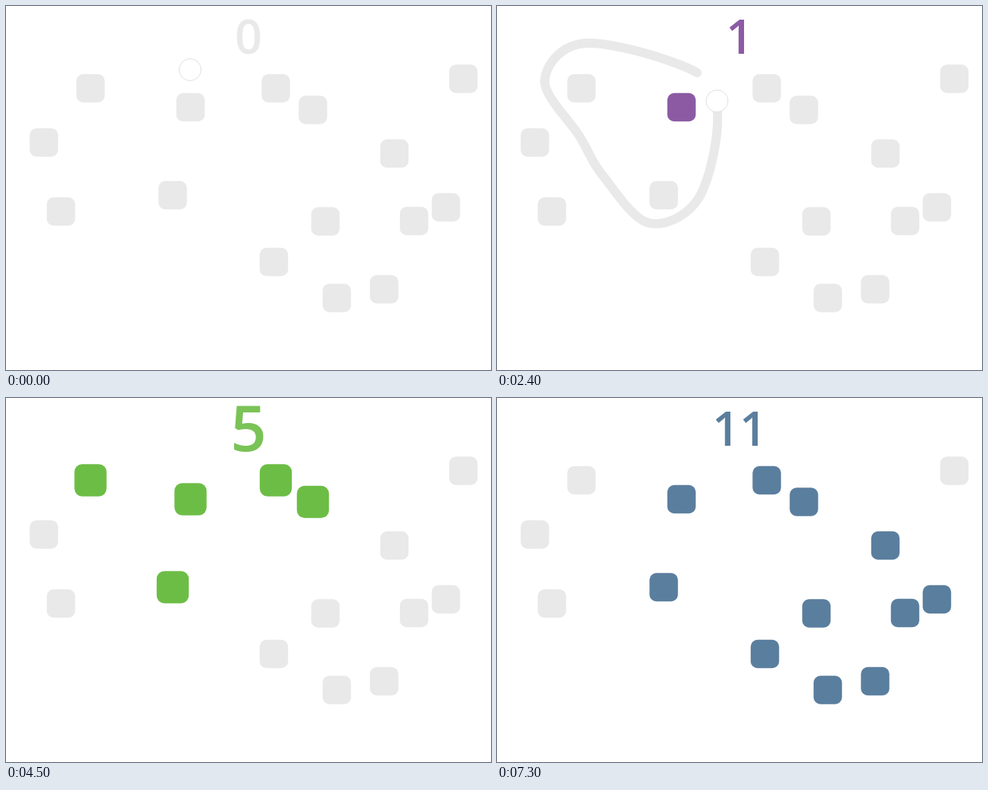
Animation of 640x480 px, one loop 7.8 s. Source, as an HTML page with a canvas:

```html
<!DOCTYPE html>
<html lang="en">
<head>
<meta charset="utf-8">
<title>Lasso counter</title>
<style>
html, body { margin: 0; width: 100%; height: 100%; overflow: hidden; background: #fff; }
canvas { display: block; }
</style>
</head>
<body>
<canvas id="stage" width="640" height="480"></canvas>
<script>
const ctx = document.getElementById('stage').getContext('2d');
const LOOP = 7800, STEP = 100, POP = 300, GREY = '#e9e9e9';

// Ordered so that every lasso catches one contiguous run.
const squares = [
  [111.5, 108.5], [243.5, 133.5], [220, 249.5], [356, 108.5], [405, 137],
  [421.5, 284], [538.5, 283.5], [580.5, 265.5], [353.5, 337.5], [436.5, 385],
  [499, 373.5], [512.5, 194.5], [603.5, 96], [50, 180], [72.5, 271]
];

// Each lasso is a closed curve through a few keys, passed every `pace` ms.
const lassos = [
  { start: 0, pace: 175, from: 1, to: 2, color: '#80499a',
    keys: [[243, 84], [195, 133], [243, 182], [292, 133]] },
  { start: 1300, pace: 150, from: 0, to: 3, color: '#ff4d44',
    keys: [[264, 88], [118, 49], [63, 98], [109, 172], [140, 224], [200, 286],
      [265, 255], [291, 150]] },
  { start: 3100, pace: 200, from: 0, to: 5, color: '#6cbd45',
    keys: [[275, 54], [90, 64], [90, 185], [222, 302], [365, 205], [440, 120], [340, 42]] },
  { start: 5100, pace: 200, from: 1, to: 12, color: '#497094',
    keys: [[216, 66], [160, 280], [317, 395], [479, 416], [562, 373], [612, 310],
      [600, 203], [475, 83], [286, 42]] }
];
for (const l of lassos) l.done = l.start + l.pace * l.keys.length;

// Closed Catmull-Rom curve at fractional key index u.
function along(keys, u) {
  const n = keys.length, i = Math.floor(u), f = u - i;
  const [a, b, c, d] = [-1, 0, 1, 2].map(k => keys[(i + k + n) % n]);
  return [0, 1].map(k => b[k] + f / 2 * (c[k] - a[k]
    + f * (2 * a[k] - 5 * b[k] + 4 * c[k] - d[k]
    + f * (3 * (b[k] - c[k]) + d[k] - a[k]))));
}

function drawLasso({ start, pace, keys }, t) {
  const end = (t - start) / pace;
  ctx.beginPath();
  for (let u = 0; u < end; u += 0.05) ctx.lineTo(...along(keys, u));
  ctx.lineTo(...along(keys, end));
  ctx.strokeStyle = GREY;
  ctx.lineWidth = 12;
  ctx.lineCap = ctx.lineJoin = 'round';
  ctx.stroke();

  ctx.beginPath();
  ctx.arc(...along(keys, end), 14.5, 0, 2 * Math.PI);
  ctx.fillStyle = '#fff';
  ctx.fill();
  ctx.strokeStyle = '#e0e0e0';
  ctx.lineWidth = 1;
  ctx.stroke();
}

function drawSquare([x, y], color, alpha, scale) {
  const size = 37.5 * scale;
  ctx.globalAlpha = alpha;
  ctx.fillStyle = color;
  ctx.beginPath();
  ctx.roundRect(x - size / 2, y - size / 2, size, size, 9 * scale);
  ctx.fill();
}

function drawCount(count, color, alpha, scale) {
  ctx.save();
  ctx.globalAlpha = alpha;
  ctx.fillStyle = color;
  ctx.font = '600 63px "Open Sans", sans-serif';
  ctx.textAlign = 'center';
  ctx.translate(320, 40.5);
  ctx.scale(scale, scale);
  ctx.fillText(count, 0, 22.5);
  ctx.restore();
}

function draw(t) {
  ctx.globalAlpha = 1;
  ctx.fillStyle = '#fff';
  ctx.fillRect(0, 0, 640, 480);

  const active = lassos.find(l => t >= l.start && t < l.done);
  if (active) drawLasso(active, t);

  const hit = lassos.filter(l => t >= l.done).pop();
  const pop = hit ? Math.max(0, 1 - (t - hit.done) / POP) ** 2 : 0;
  squares.forEach((s, i) => {
    if (hit && i >= hit.from && i < hit.to)
      drawSquare(s, hit.color, 0.9 + 0.1 * pop, 1 + 0.13 * pop);
    else drawSquare(s, GREY, 1, 1);
  });

  if (hit) drawCount(hit.to - hit.from, hit.color, 0.9, 1 + 0.32 * pop);
  else drawCount(0, GREY, 1, 1);
}

const origin = performance.now();
function tick() {
  const t = Math.max(0, performance.now() - origin) % LOOP;
  draw(Math.floor(t / STEP) * STEP);
  requestAnimationFrame(tick);
}
tick();
</script>
</body>
</html>
```
